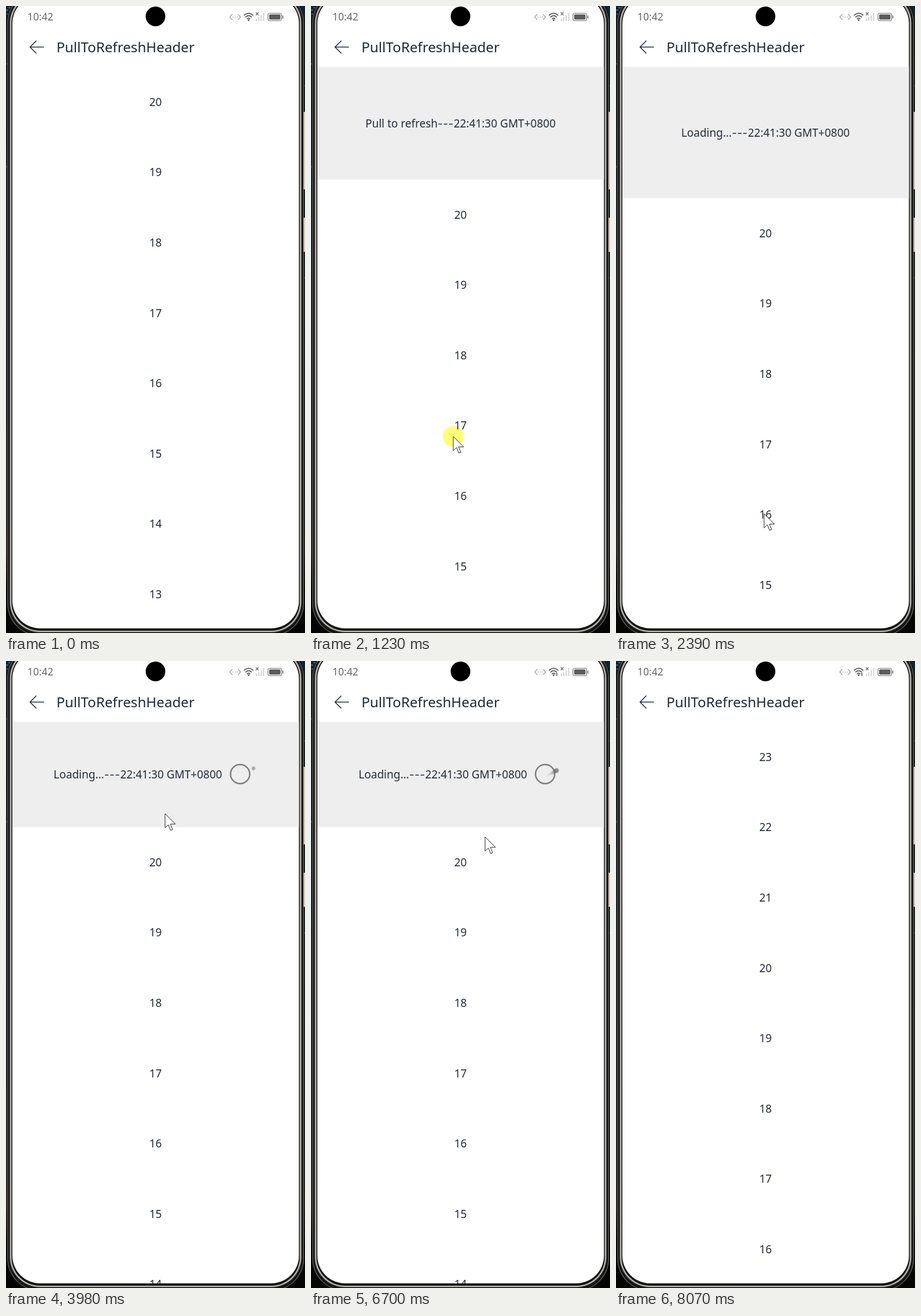
An HTML page that plays this animation: 517 by 1084 pixels, repeating every 8470 ms.

```html
<!DOCTYPE html>
<html lang="en">
<head>
<meta charset="utf-8">
<title>PullToRefreshHeader</title>
<style>
  html, body { margin: 0; width: 100%; height: 100%; overflow: hidden; background: #0c1319; }
  svg { display: block; width: 517px; height: 1084px; }
  text { font-family: "Noto Sans", "Open Sans", sans-serif; font-size: 19px; fill: #232c39; }
  .mid { text-anchor: middle; }
  .title { font-size: 24.2px; font-weight: 500; fill: #1f2937; }
  .clock { font-size: 17.5px; font-weight: 500; fill: #666; }
  .dash { font-family: Inter, sans-serif; letter-spacing: .5px; }
  .line { fill: none; stroke-linecap: round; stroke-linejoin: round; }
</style>
</head>
<body>
<svg viewBox="0 0 517 1084">
  <defs>
    <linearGradient id="wall" x2="0" y2="1">
      <stop offset="0" stop-color="#10222e"/>
      <stop offset=".3" stop-color="#1b2c38"/>
      <stop offset=".8" stop-color="#26313a"/>
      <stop offset=".87" stop-color="#3a302b"/>
      <stop offset=".93" stop-color="#050505"/>
    </linearGradient>
    <clipPath id="screenClip"><rect x="11" y="-18" width="495.5" height="1094" rx="48"/></clipPath>
    <clipPath id="listClip"><rect x="11" y="105" width="496" height="979"/></clipPath>
    <clipPath id="headClip"><rect id="headBox" x="11" y="105.3" width="496" height="0"/></clipPath>
  </defs>

  <rect width="517" height="1084" fill="url(#wall)"/>
  <path d="M0 7h4M4 3h5M1 14h3M0 100h2M0 278h2M515 138h2M515 470h2" stroke="#8d979c" stroke-width="1"/>
  <g id="bezel"></g>
  <path d="M514.500 183h3v134h-3zM514.500 366h3v59h-3z" fill="#d5c4bc"/>

  <g clip-path="url(#screenClip)">
    <rect width="517" height="1084" fill="#fff"/>
    <g clip-path="url(#listClip)">
      <rect id="head" x="11" y="105.3" width="496" height="0" fill="#eee"/>
      <g id="list"></g>
    </g>
    <g clip-path="url(#headClip)">
      <text id="status" class="mid"><tspan id="label"></tspan><tspan class="dash">---</tspan><tspan id="stamp"></tspan></text>
      <g id="spinner">
        <g id="back"></g>
        <circle cx="404.800" cy="195.500" r="16.600" fill="none" stroke="#7d7d7d" stroke-width="2.500"/>
        <g id="front"></g>
      </g>
    </g>

    <text class="clock" x="37" y="25">10:42</text>
    <text class="title" x="87.200" y="79.700">PullToRefreshHeader</text>
    <path class="line" d="M42 71H65M52 60.500L41.500 71L52 81.500" stroke="#283140" stroke-width="1.700"/>

    <g class="line" stroke="#a5a5a5" stroke-width="1.400">
      <path d="M391 14.500L387 19L391 23.500M401.500 14.500L405.500 19L401.500 23.500"/>
      <path d="M392.500 19h.1M396.300 19h.1M400 19h.1" stroke-width="1.700"/>
    </g>
    <g class="line" stroke="#666" stroke-width="1.900">
      <path d="M412 15.800Q419.500 9 427 15.800M414.600 19Q419.500 14.600 424.400 19M417.200 22Q419.500 20 421.800 22"/>
      <circle cx="419.500" cy="24.500" r=".7"/>
    </g>
    <path id="traffic" d="M423 22.500l2-2.500l2 2.500zM423 23.500l2 2.500l2-2.500z" fill="#555"/>
    <path d="M432 11l4.500 5M436.500 11l-4.500 5" stroke="#666" stroke-width="1.200"/>
    <path d="M433 26v-4M437 26v-6.500M441.300 26v-10M445.500 26v-14" stroke="#d2d2d2" stroke-width="2"/>
    <rect x="453" y="12.500" width="23.500" height="13" rx="3.500" fill="#fff" stroke="#777" stroke-width="1.200"/>
    <rect x="455" y="14.500" width="19.500" height="9" rx="1.800" fill="#5c5c5c"/>
    <path class="line" d="M478.700 17v4" stroke="#777" stroke-width="1.700"/>
  </g>

  <circle cx="258.500" cy="18" r="17" fill="#000"/>
  <g id="pointer">
    <circle id="press" r="18" fill="#ffff78" style="mix-blend-mode:multiply"/>
    <path d="M0 0V24.500L5.700 19.200L9.600 28.700L13 27.300L9.200 18H18Z" fill="#fff" stroke="#222" stroke-width="1"/>
  </g>
</svg>

<script>
const LOOP = 8470, ROW = 121.6, REST = 182;
const $ = id => document.getElementById(id);
const NS = "http://www.w3.org/2000/svg";

function add(parent, tag, attrs) {
  const el = document.createElementNS(NS, tag);
  set(el, attrs);
  parent.appendChild(el);
  return el;
}
function set(el, attrs) {
  for (const k in attrs) el.setAttribute(k, attrs[k]);
}
const show = (el, on) => el.style.display = on ? "" : "none";

// Nested shells around the screen: side inset, bottom edge, colour
[[1.5, 1092, "#0a0a0a"], [2.5, 1089, "#77736f"], [3.6, 1088, "#141414"],
 [6.2, 1083, "#5a5856"], [7.2, 1082, "#bdbab6"], [9.4, 1080, "#161616"]]
  .forEach(([d, bottom, fill]) => add($("bezel"), "rect", {
    x: d, y: d - 29, width: 517.5 - 2 * d, height: bottom - d + 29, rx: 58.5 - d, fill
  }));

const rows = Array.from({ length: 9 }, () => add($("list"), "text", { class: "mid", x: 258.5 }));

// Comet: blobs from tail to head, on the far and near side of the ring
const BLOBS = 16;
const blobs = ["back", "front"].map(id =>
  Array.from({ length: BLOBS }, () => add($(id), "circle", { fill: "#6f6f6f" })));

// time, x, y
const path = [
  [70, 262, 480], [350, 255, 545], [500, 254, 550], [880, 250, 636], [1230, 246, 744],
  [1650, 246, 840], [1950, 247, 895], [2200, 248, 896], [2390, 256, 878], [2670, 262, 817],
  [3560, 275, 541], [3980, 275, 264], [4440, 276, 262], [5120, 300, 199], [5390, 300, 197],
  [5600, 301, 199], [6220, 302, 232], [6700, 301, 304], [7110, 303, 352], [7400, 332, 385],
  [7700, 440, 620], [7900, 499, 900], [8010, 490, 1053]
];
// time, header height
const pull = [[500, 0], [880, 86], [1230, 194.5], [1650, 290], [1950, 347], [2200, 347]];
// start time, label, time stamp
const states = [
  [0, "Pull to refresh", "22:41:30"],
  [1380, "Release to refresh", "22:41:30"],
  [2200, "Loading...", "22:41:30"],
  [4500, "Refresh failed", "22:41:30"],
  [5420, "Loading...", "22:41:30"],
  [7150, "Refresh succeeded", "22:42:12"]
];
const isSpinning = t => t >= 2600 && t < 4500 || t >= 5420 && t < 7150;

function sample(table, t) {
  if (t <= table[0][0]) return table[0].slice(1);
  const i = table.findIndex(r => r[0] > t);
  if (i < 0) return table[table.length - 1].slice(1);
  const a = table[i - 1], b = table[i], p = (t - a[0]) / (b[0] - a[0]);
  return a.slice(1).map((v, k) => v + (b[k + 1] - v) * p);
}
function easeOut(t, t0, t1, from, to) {
  const p = Math.min(1, Math.max(0, (t - t0) / (t1 - t0)));
  return to + (from - to) * (1 - p) ** 2;
}
function headerHeight(t) {
  if (t < 2200) return sample(pull, t)[0];
  return t < 7500 ? easeOut(t, 2200, 2600, 347, REST) : easeOut(t, 7500, 7920, REST, 0);
}

function drawSpinner(t) {
  const on = isSpinning(t);
  show($("spinner"), on);
  if (!on) return;
  const turn = 2 * Math.PI / 1200;
  const head = t < 5000 ? 1.75 + (t - 3980) * turn : .94 + (t - 6700) * turn;
  const tilt = -23 * Math.PI / 180;
  const depth = Math.max(.12, .4 + .6 * Math.cos(head));
  for (let i = 0; i < BLOBS; i++) {
    const k = (i + 1) / BLOBS, a = head - (1 - k) * .9;
    const u = 25.5 * Math.sin(a), v = 3.5 * Math.cos(a), near = Math.cos(a) > 0;
    set(blobs[+near][i], {
      cx: 404.8 + u * Math.cos(tilt) - v * Math.sin(tilt),
      cy: 195.5 + u * Math.sin(tilt) + v * Math.cos(tilt),
      r: (1.8 + 1.6 * k) * (1 + .3 * Math.cos(head)),
      opacity: depth * (i === BLOBS - 1 ? .8 : .36 * k * k + .03)
    });
    show(blobs[+near][i], true);
    show(blobs[+!near][i], false);
  }
}

function draw(t) {
  const h = headerHeight(t);
  $("head").setAttribute("height", h);
  $("headBox").setAttribute("height", h);

  const top = t >= 7150 ? 23 : 20;
  rows.forEach((row, i) => {
    row.textContent = top - i;
    row.setAttribute("y", 172.8 + ROW * i + h);
  });

  const [, label, stamp] = states.filter(s => s[0] <= t).pop();
  $("label").textContent = label;
  $("stamp").textContent = stamp + " GMT+0800";
  set($("status"), { x: isSpinning(t) ? 228 : 258.5, y: 112.2 + h / 2 });
  drawSpinner(t);

  show($("traffic"), t >= 5800);
  show($("pointer"), t >= 70 && t < 8050);
  show($("press"), t >= 420 && t < 2200 || t >= 5390 && t < 5500);
  const [x, y] = sample(path, t);
  $("pointer").setAttribute("transform", `translate(${x} ${y})`);
}

const start = performance.now();
function tick() {
  draw((performance.now() - start) % LOOP);
  requestAnimationFrame(tick);
}
tick();
</script>
</body>
</html>
```
